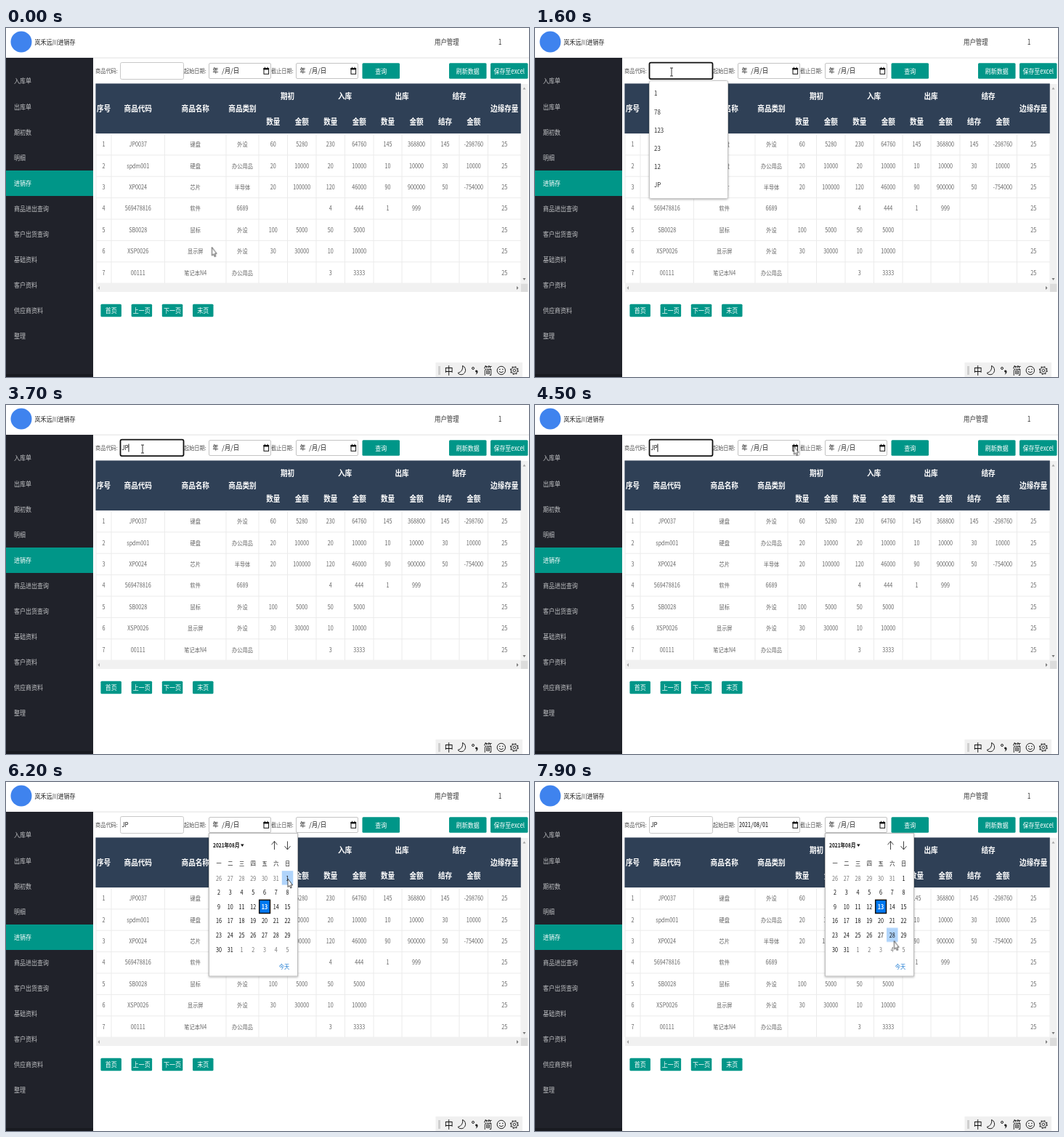
An HTML page for the animation above (8 s loop, 720 by 480 pixels).

```html
<!DOCTYPE html>
<html lang="zh-CN">
<head>
<meta charset="utf-8">
<title>进销存</title>
<style>
html, body { margin: 0; width: 100%; height: 100%; overflow: hidden; background: #fff; }
svg { display: block; width: 720px; height: 480px; }
text { font-family: "Noto Sans CJK SC", "Noto Sans CJK", "Open Sans", sans-serif; white-space: pre; }
.mono { font-family: "Noto Sans Mono CJK SC", "Noto Sans CJK SC", monospace; }
.bold { font-weight: 700; }
.mid { text-anchor: middle; }

.anim { animation: 8s step-end infinite; }
.focus { animation-name: focus; }
.list { animation-name: list; }
.one { animation-name: one; }
.two { animation-name: two; }
.ime { animation-name: ime; }
.caret { animation-name: caret; }
.cal1 { animation-name: cal1; }
.cal2 { animation-name: cal2; }
.unset { animation-name: unset-date; }
.set { animation-name: set-date; }
.hover1 { animation-name: hover1; }
.hover2 { animation-name: hover2; }
.beam { animation-name: beam; }
.arrow { animation-name: arrow; }
.pointer { animation: move 8s ease-in-out infinite; }

@keyframes focus { 0% { opacity: 0 } 16.25% { opacity: 1 } 58.75%, 100% { opacity: 0 } }
@keyframes list { 0% { opacity: 0 } 16.25% { opacity: 1 } 27.5%, 100% { opacity: 0 } }
@keyframes one { 0% { opacity: 0 } 27.5% { opacity: 1 } 30.6%, 100% { opacity: 0 } }
@keyframes two { 0% { opacity: 0 } 30.6%, 100% { opacity: 1 } }
@keyframes ime { 0% { opacity: 0 } 27.5% { opacity: 1 } 41.25%, 100% { opacity: 0 } }
@keyframes caret {
  0% { opacity: 0; transform: translateX(0) }
  16.25% { opacity: 1; transform: translateX(0) }
  18.75% { opacity: 0; transform: translateX(0) }
  25% { opacity: 1; transform: translateX(0) }
  27.5% { opacity: 1; transform: translateX(4.2px) }
  30.6% { opacity: 1; transform: translateX(9px) }
  37% { opacity: 0; transform: translateX(9px) }
  41.25% { opacity: 1; transform: translateX(9px) }
  47.5% { opacity: 0; transform: translateX(9px) }
  53.75% { opacity: 1; transform: translateX(9px) }
  58.75%, 100% { opacity: 0; transform: translateX(9px) }
}
@keyframes cal1 { 0% { opacity: 0 } 61.25% { opacity: 1 } 78.75%, 100% { opacity: 0 } }
@keyframes cal2 { 0% { opacity: 0 } 91.25%, 100% { opacity: 1 } }
@keyframes unset-date { 0% { opacity: 1 } 78.75%, 100% { opacity: 0 } }
@keyframes set-date { 0% { opacity: 0 } 78.75%, 100% { opacity: 1 } }
@keyframes hover1 { 0% { opacity: 0 } 72.8%, 100% { opacity: 1 } }
@keyframes hover2 {
  0% { opacity: 0; transform: translateY(0) }
  94.06% { opacity: 1; transform: translateY(0) }
  94.44% { opacity: 1; transform: translateY(19.6px) }
  94.8% { opacity: 1; transform: translateY(39.2px) }
  95.3% { opacity: 1; transform: translateY(58.8px) }
  96.06%, 100% { opacity: 1; transform: translateY(78.4px) }
}
@keyframes beam { 0% { opacity: 0 } 12.1% { opacity: 1 } 51.2%, 100% { opacity: 0 } }
@keyframes arrow { 0% { opacity: 1 } 12.1% { opacity: 0 } 51.2%, 100% { opacity: 1 } }
@keyframes move {
  0%, 1.2% { transform: translate(283.5px, 301.5px) }
  13.75%, 47.5% { transform: translate(188px, 60.5px) }
  56.25%, 66.2% { transform: translate(356.5px, 56.5px) }
  75%, 80% { transform: translate(388px, 133px) }
  86.25%, 91.25% { transform: translate(478.5px, 58px) }
  97.5%, 100% { transform: translate(494.5px, 218.5px) }
}
</style>
</head>
<body>
<svg id="stage" xmlns="http://www.w3.org/2000/svg"></svg>
<script>
// The page is shown squashed: .6 of its width, .7 of its height.
const SY = 0.7, K = 0.6 / SY, TEAL = '#009688';

const text = (x, y, size, str, fill = '#333', cls = '') => {
  const fs = size * SY;
  return `<text transform="scale(${K} 1)" x="${(x / K).toFixed(2)}" y="${(y + fs * 0.37).toFixed(2)}"
    font-size="${fs.toFixed(2)}" fill="${fill}" class="${cls}">${str}</text>`;
};
const rect = (x, y, w, h, fill, extra = '') =>
  `<rect x="${x}" y="${y}" width="${w}" height="${h}" fill="${fill}" ${extra}/>`;
const path = (d, stroke, width = 1, fill = 'none') =>
  `<path d="${d}" stroke="${stroke}" stroke-width="${width}" fill="${fill}"/>`;
const group = (cls, body, at = '') => `<g class="${cls}" ${at && `transform="translate(${at})"`}>${body}</g>`;
const button = (x, y, w, h, label) =>
  rect(x, y, w, h, TEAL, 'rx="1.5"') + text(x + w / 2, y + h / 2 + 0.3, 13.33, label, '#fff', 'mid');
const smiley = (x, y, r) => group('',
  `<circle r="${r}" fill="none" stroke="#222"/>` +
  `<circle cx="-2" cy="-1.5" r=".8" fill="#222"/><circle cx="2" cy="-1.5" r=".8" fill="#222"/>` +
  path('M-2.8 1.4Q0 4.4 2.8 1.4', '#222'), `${x} ${y}`);

function header() {
  return rect(0, 40.6, 720, 1, '#e2e2e2') +
    '<circle cx="21" cy="19" r="14.5" fill="#3f83ee"/>' +
    text(39.5, 20, 13.33, '岚禾远川进销存', '#222') +
    text(590, 19.5, 14, '用户管理') + text(680, 19.5, 14, '1', '#333', 'mid');
}

function sidebar() {
  const items = ['入库单', '出库单', '期初数', '明细', '进销存', '商品进出查询',
    '客户出货查询', '基础资料', '客户资料', '供应商资料', '整理'];
  return rect(0, 41, 120, 439, '#20222a') + rect(0, 476, 120, 4, '#181a20') +
    rect(0, 196, 120, 35, TEAL) +
    items.map((s, i) => text(11, 73 + i * 35.1, 13.33, s, i === 4 ? '#fff' : '#bfc0c3')).join('');
}

function dateField(x, value) {
  const blank = text(x + 5.5, 59, 13.33, '年', '#111') + text(x + 18, 59, 13.33, '/月/日', '#111', 'mono');
  return rect(x + 0.5, 48.5, 85, 21, '#fff', 'stroke="#c4c4c4" rx="1.5"') +
    (value ? group('anim unset', blank) +
      group('anim set', text(x + 2, 59, 13.33, value, '#111', 'mono')) : blank) +
    rect(x + 76, 55.5, 6.6, 7.8, 'none', 'stroke="#111"') + rect(x + 75.5, 55, 7.6, 2.4, '#111') +
    path(`M${x + 77.5} 53.7v2M${x + 81} 53.7v2`, '#111');
}

function filters() {
  return text(123, 59, 12, '商品代码:', '#555') +
    rect(157.5, 47.5, 87, 23, '#fff', 'stroke="#c8c8c8" rx="2"') +
    group('anim focus', rect(157.5, 47.7, 87, 22.4, '#fff', 'stroke="#111" stroke-width="1.8" rx="2"')) +
    text(159.3, 59, 13.33, 'J', '#222', 'anim one') + text(159.3, 59, 13.33, 'JP', '#222', 'anim two') +
    group('anim caret', rect(159.5, 53.5, 0.9, 11, '#000')) +
    text(245, 59, 12, '起始日期:', '#555') + dateField(279, '2021/08/01') +
    text(365, 59, 12, '截止日期:', '#555') + dateField(399) +
    button(490.5, 48.3, 51.5, 21.4, '查询') + button(610, 48.3, 51.5, 21.4, '刷新数据') +
    button(667, 48.3, 51.5, 21.4, '保存至excel');
}

function table() {
  const edges = [124, 145, 218.5, 303, 348, 387.5, 427, 466.5, 506, 545, 585, 624, 663.5, 709];
  const mids = edges.slice(1).map((e, i) => (e + edges[i]) / 2);
  const rows = [
    '1,JP0037,键盘,外设,60,5280,230,64760,145,368800,145,-298760,25',
    '2,spdm001,硬盘,办公用品,20,10000,20,10000,10,10000,30,10000,25',
    '3,XP0024,芯片,半导体,20,100000,120,46000,90,900000,50,-754000,25',
    '4,569478816,软件,6689,,,4,444,1,999,,,25',
    '5,SB0028,鼠标,外设,100,5000,50,5000,,,,,25',
    '6,XSP0026,显示屏,外设,30,30000,10,10000,,,,,25',
    '7,00111,笔记本N4,办公用品,,,3,3333,,,,,25'
  ];
  const head = (x, y, s) => text(x, y, 16, s, '#fff', 'mid bold');
  const subs = ['数量', '金额', '数量', '金额', '数量', '金额', '结存', '金额'];
  let out = rect(123.4, 76.4, 585.4, 68.7, '#2f4056');
  ['序号', '商品代码', '商品名称', '商品类别'].forEach((s, i) => out += head(mids[i], 111, s));
  out += head(mids[12], 111, '边缘存量');
  ['期初', '入库', '出库', '结存'].forEach((s, i) => out += head(edges[5 + i * 2], 94, s));
  subs.forEach((s, i) => out += head(mids[4 + i], 129, s));
  rows.forEach((row, r) => {
    out += rect(124, 174.3 + r * 29.4, 585, 1, '#ebebeb');
    row.split(',').forEach((s, c) => s && (out += text(mids[c], 160 + r * 29.4, 12, s, '#666', 'mid')));
  });
  edges.forEach(x => out += rect(x - 0.5, 145.1, 1, 206, '#ebebeb'));
  return out + rect(709, 77, 9.5, 274, '#f1f1f1') + rect(124, 351.5, 585, 11.5, '#f1f1f1') +
    rect(709, 351.5, 9.5, 11.5, '#dcdcdc') +
    path('M711.5 84.5h4l-2 -3z', 'none', 0, '#a3a3a3') + path('M711.5 344h4l-2 3z', 'none', 0, '#777') +
    path('M129 355v5l-2.5 -2.5z', 'none', 0, '#a3a3a3') + path('M703 355v5l2.5 -2.5z', 'none', 0, '#777');
}

const pager = () => ['首页', '上一页', '下一页', '末页']
  .map((s, i) => button(130.4 + i * 42.2, 379.7, 28.5, 17.6, s)).join('');

function inputBar() {
  return rect(591.5, 460, 119.5, 20, '#f0f0f0') + rect(595, 465, 3, 12, '#cfcfcf') +
    text(609.8, 471, 20, '中', '#111', 'mid') +
    path('M628.5 464.5A6 6.3 0 1 1 622 474.5A8 8 0 0 0 628.5 464.5Z', '#222') +
    '<circle cx="643" cy="468" r="1.5" fill="none" stroke="#222"/>' +
    path('M647.5 470.5q2 0 2 2q0 3 -3 4.2q1.4 -1.7 1.2 -3q-1.7 -.5 -1.7 -1.7q0 -1.5 1.5 -1.5z', 'none', 0, '#222') +
    text(663.5, 471, 20, '简', '#111', 'mid') + smiley(681.8, 471, 5.7) +
    '<g fill="none" stroke="#222"><circle cx="699.8" cy="471" r="5.3" stroke-width="1.2" stroke-dasharray="2.1 2.06"/>' +
    '<circle cx="699.8" cy="471" r="4.3" stroke-width=".9"/><circle cx="699.8" cy="471" r="1.8" stroke-width=".9"/></g>';
}

function suggestions() {
  const items = ['1', '78', '123', '23', '12', 'JP'];
  return group('anim list', rect(157.5, 72.5, 108, 162, '#fff', 'rx="2" stroke="#c6c6c6" filter="url(#shade)"') +
    items.map((s, i) => text(164, 90 + i * 25.15, 13.33, s)).join(''));
}

function candidates() {
  return group('anim ime', path('M159.5 64h8.5', '#333', 0.8) +
    rect(159, 65, 100, 31.5, '#dfe5e8', 'stroke="#cbd2d6" stroke-width=".6"') +
    rect(159, 65, 36, 31.5, '#a8d3f8') + rect(232, 65.5, 0.8, 30.5, '#c5ccd0') +
    text(169, 80.5, 17, '1', '#5f7f9b', 'mid') +
    text(177, 80.5, 17, 'J', '#111', 'anim one') + text(177, 80.5, 17, 'JP', '#111', 'anim two') +
    path('M204.5 77l-3 4l3 4M221.5 77l3 4l-3 4', '#9aa3a8') + smiley(245, 81, 4.8));
}

function calendar(dx, cls, hover, hoverCol) {
  const colX = c => 293 + c * 15.75, rowY = r => 132.5 + r * 19.6;
  let out = rect(279.5, 70.5, 122, 196.5, '#fff', 'stroke="#bdbdbd" filter="url(#shade)"') +
    text(285, 87, 11, '2021年08月', '#111', 'bold') +
    path('M323 85.5h4.6l-2.3 3.5z', 'none', 0, '#111') +
    path('M369.5 93v-11.5m-4 4.8l4 -4.8l4 4.8M387.5 81.5v11.5m-4 -4.8l4 4.8l4 -4.8', '#444') +
    group('anim ' + hover, rect(colX(hoverCol) - 7.7, 122.2, 15.5, 19.3, '#b0d4fb')) +
    rect(348.7, 162.3, 14.8, 18.2, '#0078f0', 'stroke="#111" stroke-width="1.5"') +
    text(383, 253.5, 12, '今天', '#1a78d0', 'mid');
  [...'一二三四五六日'].forEach((s, c) => out += text(colX(c), 112, 12, s, '#222', 'mid'));
  for (let i = 0; i < 42; i++) {
    const n = i - 5, inside = n > 0 && n < 32, today = n === 13;
    const label = n < 1 ? n + 31 : inside ? n : n - 31;
    out += text(colX(i % 7), rowY(Math.floor(i / 7)), 12, label,
      today ? '#fff' : inside ? '#111' : '#777', today ? 'mid bold' : 'mid');
  }
  return group('anim ' + cls, group('', out, `${dx} 0`));
}

const pointer = () => group('pointer',
  group('anim arrow', path('M0 0V11.5L2.2 9.5L3.8 13L5.3 12.4L3.8 8.9H6.6Z', '#222', 0.8, '#fff')) +
  group('anim beam', path('M-2 -5.5H2M0 -5.5V5.5M-2 5.5H2', '#222', 0.9)));

document.getElementById('stage').innerHTML =
  `<defs><filter id="shade" x="-10%" y="-10%" width="120%" height="120%">
    <feDropShadow dx="0" dy="1" stdDeviation="1.5" flood-opacity=".3"/></filter></defs>` +
  header() + sidebar() + filters() + table() + pager() + inputBar() +
  suggestions() + candidates() +
  calendar(0, 'cal1', 'hover1', 6) + calendar(120, 'cal2', 'hover2', 5) + pointer();
</script>
</body>
</html>
```
